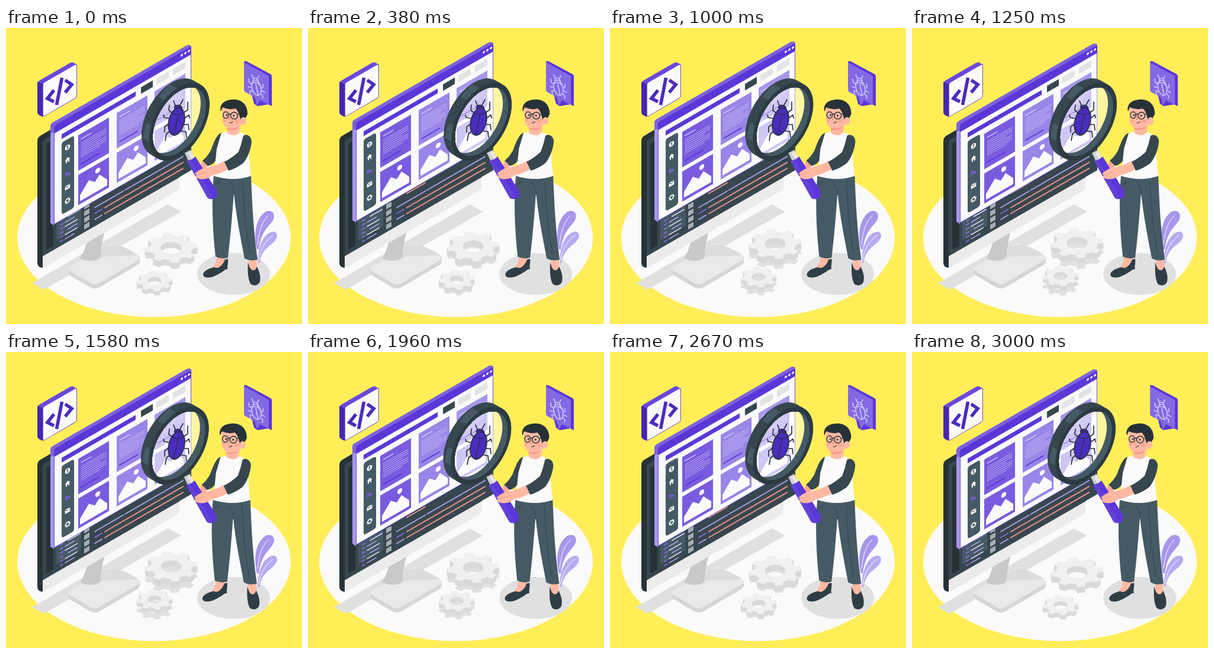
An HTML page for the animation above (3.04 s loop, 500x500 px).

```html
<!DOCTYPE html>
<html lang="en">
<head>
<meta charset="utf-8">
<title>Bug hunting</title>
<style>
  html, body { margin: 0; width: 100%; height: 100%; overflow: hidden; background: #ffee58; }
  svg { display: block; width: 100vw; height: 100vh; }
  .line { fill: none; stroke-linecap: round; stroke-linejoin: round; }
</style>
</head>
<body>
<svg viewBox="0 0 500 500">
  <ellipse cx="250" cy="354.5" rx="231" ry="133.7" fill="#fafafa"/>
  <path d="M44 431L273 298L296 310L64 442Z" fill="#e0e0e0"/>
  <ellipse cx="384.5" cy="415.5" rx="61.5" ry="35.5" fill="#e0e0e0"/>

  <!-- stand -->
  <path d="M105 406V412Q105 416 110 419L142 438Q150 442 158 438L221 401Q226 398 226 394V386Z" fill="#d6d6d6"/>
  <path d="M108 403L175 365Q181 362 187 365L222 384Q229 389 222 393L157 431Q150 435 143 431L109 411Q102 407 108 403Z" fill="#e9e9e9"/>
  <path d="M151 394L165 386L224 384Q212 375 186 365L166 369Z" fill="#dcdcdc"/>
  <path d="M139 352L166 338V347Q161 364 160 384Q158 392 147 393Q133 394 125 389Q133 378 139 352Z" fill="#c9c9c9"/>

  <!-- monitor -->
  <path d="M53 191Q53 185 58 182L75 172L84 180L62 193V405Q53 404 53 397Z" fill="#263238"/>
  <g id="screen" transform="matrix(1 -.577 0 1 62 190)">
    <path d="M0 4Q0 0 4 0H251V195H0Z" fill="#37474f"/>
    <path d="M6 9H18V188H6Z" fill="#263238"/>
    <path d="M23 9H65V182H23Z" fill="#455a64"/>
    <path d="M0 195H231V211Q231 216 226 216H4Q0 216 0 211Z" fill="#ebebeb"/>
    <path d="M0 195H231" stroke="#263238"/>
  </g>

  <!-- browser window -->
  <g id="window">
    <path d="M75 168Q74 163 79 160L305 30Q310 28 313 31V40L81 176V333L75 330Z" fill="#7d61e2"/>
    <path d="M75 178L81 177V334L75 330Z" fill="#a796ec"/>
    <g id="page" transform="matrix(1 -.577 0 1 81 165.5)">
      <path d="M.4 13H231.6V166.6H.4Z" fill="#fafafa" stroke="#5b37d8" stroke-width=".8"/>
      <path d="M0 4Q0 0 4 0H229Q232 0 232 3V13H0Z" fill="#5b37d8"/>
      <g fill="#fff"><circle cx="216" cy="5.5" r="1.9"/><circle cx="222" cy="5.5" r="1.9"/><circle cx="228" cy="5.5" r="1.9"/></g>
      <path d="M13 22H138V30H13Z" fill="#5b37d8"/>
      <path d="M147 20H167V31H147Z" fill="#37474f"/>
      <path d="M173 20H194V31H173ZM201 20H222V31H201Z" fill="#e3e3e3"/>
      <rect x="13" y="36" width="21" height="122" rx="4" fill="#455a64"/>
      <g transform="translate(23 50)" fill="#fff">
        <circle r="4.3"/><path d="M-2.7 2.5Q0 -.5 2.7 2.5Z" fill="#455a64"/><circle cy="-1.3" r="1.5" fill="#455a64"/>
        <path d="M-4.5 21L0 16.5L4.5 21H3V25.5H1V22.5H-1V25.5H-3V21Z"/>
        <path d="M-4 40H-2.2V48H-4ZM-1.4 42H.4V48H-1.4ZM1.2 44H4V48H1.2Z" fill="#7d61e2"/>
        <path d="M-4.3 63.5H4.3V70.5H-4.3Z"/><path d="M-4 64L0 67.5L4 64" class="line" stroke="#455a64"/>
        <circle cy="90" r="3" fill="none" stroke="#fff" stroke-width="1.7"/>
        <circle cy="90" r="4.2" fill="none" stroke="#fff" stroke-width="1.3" stroke-dasharray="1.65"/>
      </g>
    </g>
  </g>

  <!-- code sign -->
  <path d="M53 94Q53 91 56 89L108 59Q112 57 115 59L119 62L62 95V150L56 147Q53 145 53 142Z" fill="#6a48de"/>
  <path d="M53 91L62 95V150L56 147Q53 145 53 142Z" fill="#4526b0"/>
  <g transform="matrix(1 -.577 0 1 62 93)">
    <rect x=".3" y=".3" width="57" height="57" rx="3" fill="#fafafa" stroke="#5b37d8" stroke-width=".9"/>
  </g>
  <path d="M81 105L70 119L81 124.500M94.500 84L85.500 130M100 88L111 95.500L100 109" fill="none" stroke="#4a2cbe" stroke-width="5.6"/>

  <!-- speech sign -->
  <path d="M402 58Q402 55 406 56L447 78Q449 79 449 82V132L443 129L425 132L419 128Z" fill="#5b37d8"/>
  <path d="M402 58L444 81V130L429 122L424 131L420 117L404 108Q402 107 402 104Z" fill="#8469e4"/>
  <g class="line" stroke="#cbc0f5" stroke-width="1.7">
    <ellipse cx="423" cy="101" rx="7.500" ry="13" transform="rotate(-14 423 101)"/>
    <path d="M416 93Q424 90 430 98M422 95L426 114M418 89Q417 83 422 85Q427 87 426 92M418 85L415 79M424 86L427 81M415 95L411 92L410 86M415 101L409 99M417 107L412 106L413 113M431 101L434 101L434 95M432 106L437 109M430 111L434 115L433 119"/>
  </g>

  <g id="gears"></g>

  <!-- plant -->
  <path d="M424 374C417 346 423 320 439 310C452 305 457 318 449 328C437 342 430 350 427 374Z" fill="#a896ec"/>
  <path d="M426 397C424 370 436 344 453 344C462 347 458 359 446 367C434 376 430 386 428 397Z" fill="#b8aaf1"/>
  <path d="M425 366C427 344 432 328 443 317M427 392C430 372 438 360 451 350" class="line" stroke="#fafafa" stroke-width="1"/>

  <g id="lens">
    <ellipse transform="matrix(.866 -.5 0 1 284 153)" rx="52" ry="52" fill="#fff" opacity=".45"/>
  </g>

  <!-- bug -->
  <g class="line" stroke="#263238" stroke-width="1.7">
    <path d="M286 131L283 123M294 130L299 121M280 143L275 139L276 130M276 153L267 151L266 147M275 162L268 167L268 176M278 173L271 179L269 190M300 143L307 138L307 125M302 152L309 147L310 152M301 163L308 163L309 172M296 174L304 175L305 185"/>
    <ellipse cx="291" cy="135" rx="6.500" ry="4.500" fill="#4526b0" transform="rotate(14 291 135)"/>
    <ellipse cx="288" cy="158" rx="13" ry="23.500" fill="#4a2cbe" transform="rotate(14 288 158)"/>
    <path d="M280 144Q291 148 301 143M291 146L283 181" stroke-width="1.2"/>
  </g>

  <g id="person">
    <!-- feet -->
    <path d="M356 385H372L369 398L358 408L347 406Q356 399 356 385Z" fill="#ffb9a3"/>
    <path d="M333 416C335 408 347 405 352 404C358 408 366 402 370 391L375 390C376 398 373 403 375 407L371 408C364 413 352 421 343 421.500Q333 422 333 416Z" fill="#2f3e46"/>
    <path d="M410 390H424L424 407Q420 416 411 407Z" fill="#ffb9a3"/>
    <path d="M409 396C408 412 409 424 413 432C418 437 427 435 429 428C431 418 427 409 424 403C421 412 414 411 411 402Z" fill="#2f3e46"/>

    <!-- trousers -->
    <path d="M351 249H414C416 300 418 340 425 391Q413 395 403 389C396 352 389 318 385 278C382 320 379 355 375 388Q363 391 354 386C349 340 347 290 351 249Z" fill="#455a64"/>
    <path d="M385 282Q387 270 378 261M361 259Q356 264 352 264M400 259Q402 320 412 380" class="line" stroke="#37474f" stroke-width="1.2"/>

    <!-- body -->
    <path d="M362 179Q369 175 374 176H394Q405 178 409 185C410 204 411 230 414 250Q385 260 351 250C354 236 353 220 356 205Q356 187 362 179Z" fill="#fafafa"/>
    <path d="M372 160H397L394 177Q386 185 374 178Z" fill="#ffb9a3"/>
    <path d="M374 167Q384 170 393 164L391 170Q382 175 374 171Z" fill="#f59a86"/>

    <!-- head -->
    <path d="M366 134C365 150 365 161 371 167Q378 172 390 168L398 163V140L388 131Z" fill="#ffb9a3"/>
    <path d="M363 141C360 130 368 122 381 121C398 119 409 130 408 146L404 153L398 160L395 150Q393 141 388 136Q377 139 366 134Z" fill="#263238"/>
    <ellipse cx="401" cy="157" rx="5" ry="6.500" fill="#ffb9a3"/>
    <ellipse cx="390" cy="157" rx="4" ry="2.800" fill="#ff9585" opacity=".6"/>
    <ellipse cx="369" cy="156" rx="2.500" ry="2.400" fill="#ff9585" opacity=".6"/>
    <circle cx="373" cy="147" r="1.500" fill="#263238"/><circle cx="385" cy="148" r="1.600" fill="#263238"/>
    <g class="line" stroke="#263238" stroke-width="1.4">
      <ellipse cx="371.500" cy="147" rx="4.700" ry="5.500"/><ellipse cx="385.500" cy="148" rx="6" ry="5.800"/>
      <path d="M376 146Q378 144 380 146M391 146L400 146M378 160Q381 161 383 158" stroke-width="1.200"/>
      <path d="M378 148L376 155L379 155" stroke="#f07f70" stroke-width=".9"/>
    </g>

    <!-- far arm -->
    <path d="M333 223L341 230L337 241L326 243L326 236Z" fill="#ffa892"/>
    <path d="M364 177C355 180 350 197 346 207C342 214 337 220 332 224L341 233C348 231 352 228 354 224L356 204Z" fill="#37474f"/>

    <!-- magnifier -->
    <g id="ring"></g>
    <path d="M302 211L312 206L319 220L309 226Z" fill="#cfcfcf"/>
    <path d="M307 212L312 208L319 220L315 223Z" fill="#e6e6e6"/>
    <path d="M306 225Q313 224 320 217L356 275Q359 282 354 287Q347 291 341 287Z" fill="#5b37d8"/>
    <path d="M306 225L312 222L349 284L346 289Q342 289 340 286Z" fill="#6340dc"/>

    <!-- near arm -->
    <path d="M370 224L377 238C364 245 354 248 348 249C341 256 329 257 322 253Q318 251 322 248L319 246Q325 240 335 236C350 234 360 230 370 224Z" fill="#ffb9a3"/>
    <path d="M323 248Q331 246 337 244" class="line" stroke="#f59a86" stroke-width=".9"/>
    <path d="M401 182C406 178 415 182 415 192C414 206 407 221 401 228C393 234 384 239 376 241L369 226C379 221 388 214 393 209Q398 196 401 182Z" fill="#37474f"/>
  </g>
</svg>
<script>
const $ = id => document.getElementById(id);
const add = (id, markup) => $(id).insertAdjacentHTML('beforeend', markup);
const segment = (u, v, width, color, weight) =>
  `<path d="M${u} ${v}h${width}" class="line" stroke="${color}" stroke-width="${weight}"/>`;

// Code lines on the monitor
const LILAC = '#b3a4ee', RED = '#e58d86', PALE = '#e6e0fa';
let lines = '';
for (let i = 0; i < 6; i++) {
  const v = 153 + i * 7;
  lines += segment(30, v, 4, '#8469e4', 2.2)
         + segment(i % 3 ? 38 : 43, v, i % 2 ? 15 : 20, i % 2 ? LILAC : PALE, 1.8);
}
for (let i = 0; i < 4; i++) {
  lines += `<rect x="70" y="${149 + i * 11.3}" width="9" height="8" fill="#a5adb1"/>`;
}
lines += segment(88, 164, 48, LILAC, 2) + segment(139, 164, 98, LILAC, 2)
       + segment(105, 150, 31, RED, 2.3)
       + segment(88, 174, 12, '#8469e4', 2) + segment(105, 174, 132, RED, 2.3)
       + segment(88, 184, 12, LILAC, 2) + segment(105, 184, 132, RED, 2.3);
add('screen', lines);

// Text and picture cards on the page
[[41, '#7a5be0'], [106, '#9a85e8'], [170, '#a896ec']].forEach(([u, color]) => {
  let text = segment(5, 9, 17, PALE, 1.3);
  for (let i = 0; i < 8; i++) text += segment(5, 16 + i * 3.3, i % 4 === 3 ? 32 : 42, '#d5cbf7', .7);
  add('page', `
    <g transform="translate(${u} 40)"><rect width="52" height="60" fill="${color}"/>
      ${text}${segment(5, 51, 30, '#5b37d8', 2)}</g>
    <g transform="translate(${u} 107)"><rect width="52" height="51" fill="${color}"/>
      <path d="M3 36L18 19L28 28L36 20L49 36V46H3Z" fill="#fafafa"/>
      <circle cx="33" cy="11.5" r="4.2" fill="#fafafa"/></g>`);
});

// Flat gear outline with a round hole, squashed to the floor plane
function gearPath(radius, hole, teeth, turn) {
  const points = [];
  for (let i = 0; i < teeth; i++) {
    [[-.29, .8], [-.19, 1], [.19, 1], [.29, .8]].forEach(([offset, r]) => {
      const a = (i + offset) / teeth * 2 * Math.PI + turn;
      points.push(`${(radius * r * Math.cos(a)).toFixed(1)} ${(radius * r * .577 * Math.sin(a)).toFixed(1)}`);
    });
  }
  const arc = `a${hole} ${hole * .577} 0 1 0 `;
  return `M${points.join('L')}ZM${-hole} 0${arc}${2 * hole} 0${arc}${-2 * hole} 0Z`;
}
function addGear(id, x, y, radius, hole, depth) {
  const d = gearPath(radius, hole, 8, -.16);
  const copy = (dy, fill) => `<path d="${d}" transform="translate(0 ${dy})" fill="${fill}" fill-rule="evenodd"/>`;
  let body = '';
  for (let dy = depth; dy > 0; dy--) body += copy(dy, '#d9d9d9');
  add('gears', `<g transform="translate(${x} ${y})">${copy(depth, '#e0e0e0')}
    <g id="${id}">${body}${copy(0, '#f0f0f0')}</g></g>`);
}
addGear('bigGear', 279, 371.5, 44.5, 17.5, 10);
addGear('smallGear', 251, 427.5, 30.5, 11.5, 7);

// Magnifier ring: circles in the plane of the screen
function circle(x, y, r) {
  const points = [];
  for (let i = 0; i < 72; i++) {
    const a = i * Math.PI / 36;
    const u = r * Math.cos(a), v = r * Math.sin(a);
    points.push(`${(x + .866 * u).toFixed(1)} ${(y - .5 * u + v).toFixed(1)}`);
  }
  return `M${points.join('L')}Z`;
}
const FRONT = [293, 158.3], LENS = [284, 153];
const opening = circle(...FRONT, 52);
const band = (outer, inner, fill, extra = '') =>
  `<path d="${outer}${inner}" fill="${fill}" fill-rule="evenodd" ${extra}/>`;
let rim = `<clipPath id="opening"><path d="${opening}"/></clipPath>`;
for (let i = 13; i >= 0; i--) {
  rim += band(circle(FRONT[0] - i, FRONT[1] - i * .577, 58.8), opening, '#37474f');
}
add('ring', `${rim}
  <path d="M232 186Q233 172 238 160L248 167Q243 180 244 193ZM258 117Q266 104 277 95L289 102Q276 110 269 122Z" fill="#455a64"/>
  ${band(circle(...FRONT, 53), circle(...LENS, 52), '#455a64', 'clip-path="url(#opening)"')}
  ${band(circle(...FRONT, 58.8), opening, '#2c3a41')}`);
$('lens').setAttribute('clip-path', 'url(#opening)');

// Motion
const LOOP = 3040;
const SHAKE = [0, -1, 2, -4, 4, -4, 4, -4, 2, -1, 0];
const rise = phase => -10 * (1 - Math.abs(1 - 2 * (phase % 1)));
function shake(phase) {
  const step = Math.floor(phase * 10), mix = phase * 10 - step;
  return SHAKE[step] + (SHAKE[step + 1] - SHAKE[step]) * mix;
}
const move = (id, x, y) => $(id).setAttribute('transform', `translate(${x} ${y})`);

function draw(now) {
  const phase = ((now + 40) % LOOP) / LOOP;
  const sway = shake(phase);
  move('window', 0, rise(phase * 2));
  move('bigGear', 0, rise(phase));
  move('smallGear', 0, rise(phase));
  move('person', sway, 0);
  move('lens', sway, 0);
  requestAnimationFrame(draw);
}
draw(performance.now());
</script>
</body>
</html>
```
